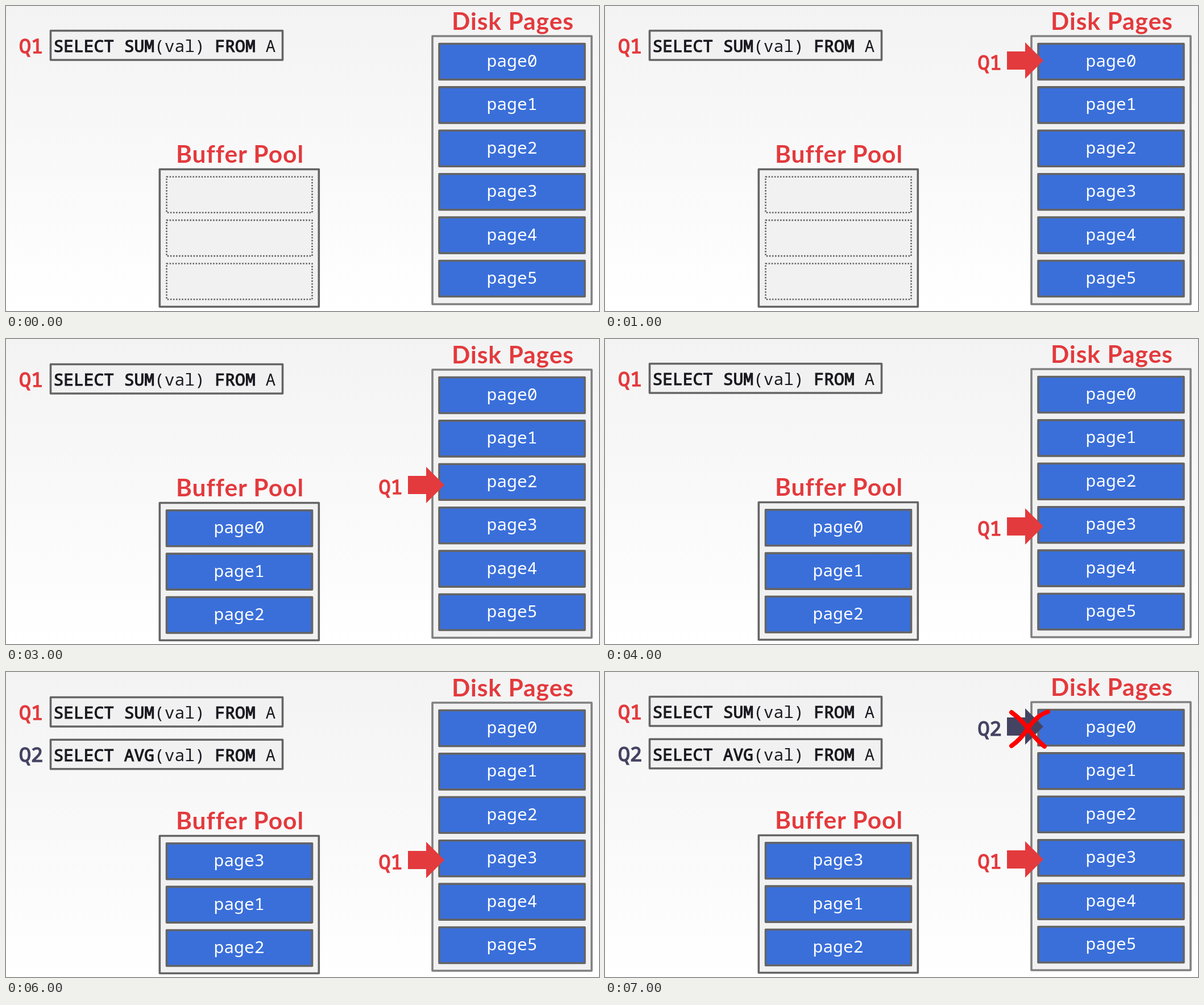
Write an HTML page that moves like this. It is 1043x537 px and loops after 8 s.

```html
<!DOCTYPE html>
<html lang="en">
<head>
<meta charset="utf-8">
<title>Buffer pool scan</title>
<style>
  html, body { margin: 0; width: 100%; height: 100%; overflow: hidden; }
  body { background: linear-gradient(#f3f3f3, #fff); }
  svg { display: block; width: 100%; height: 100%; }
  text { white-space: pre; }
  .code { font: 29.6px "Noto Sans Mono", monospace; fill: #1a1a20; }
  .code tspan { stroke: #1a1a20; stroke-width: 1.2; }
  .label { font: 35px "Noto Sans Mono", monospace; stroke-width: 1.5; }
  .title { font: 700 42.5px Lato, sans-serif; letter-spacing: 1px; text-anchor: middle; fill: #e33a3d; }
  .page text { font: 29.6px "Noto Sans Mono", monospace; fill: #fff; text-anchor: middle; }
  .page rect { fill: #3a6fda; }
  rect { fill: #f1f1f2; stroke: #646464; stroke-width: 3.6; stroke-linejoin: round; }
  .disk { stroke: #808080; }
  .slot { stroke-width: 2.6; stroke-dasharray: 2.6 2.5; }
  .evict { fill: none; stroke: #e33a3d; stroke-width: 7; }
  .cross { fill: none; stroke: #f00; stroke-width: 8; stroke-linecap: round; }
</style>
</head>
<body>
<svg id="stage" viewBox="0 0 1043 537"></svg>
<script>
const RED = "#e33a3d", NAVY = "#454362";
const STEP = 1000;
const ARROW_Y = [64, 140, 224, 298];

// dy: vertical nudge of the slide; pool: page numbers held; at: page Q1 is reading
const steps = [
  { dy: 0, pool: [] },
  { dy: 0, pool: [], at: 0 },
  { dy: 1, pool: [0], at: 0 },
  { dy: 1, pool: [0, 1, 2], at: 2 },
  { dy: 0, pool: [0, 1, 2], at: 3 },
  { dy: 0, pool: [0, 1, 2], at: 3, evict: true },
  { dy: 1, pool: [3, 1, 2], at: 3, q2: true },
  { dy: 0, pool: [3, 1, 2], at: 3, q2: true, denied: true }
];

const box = (x, y, w, h, cls = "") =>
  `<rect class="${cls}" x="${x}" y="${y}" width="${w}" height="${h}"/>`;
const text = (x, y, s, cls = "") =>
  `<text class="${cls}" x="${x}" y="${y}">${s}</text>`;
const label = (x, y, s, color) =>
  `<g fill="${color}" stroke="${color}">${text(x, y, s, "label")}</g>`;

const page = (n, x, y, textX) =>
  `<g class="page">${box(x, y, 256, 63)}${text(textX, y + 40.5, "page" + n)}</g>`;

const query = (name, fn, y, color) =>
  label(23, y + 39, name, color) +
  box(78.5, y, 408, 51.5) +
  text(83.5, y + 37.2, `<tspan>SELECT ${fn}</tspan>(val) <tspan>FROM</tspan> A`, "code");

const arrow = (name, y, color) =>
  label(655.5, y + 48, name, color) +
  `<path fill="${color}" d="M707 ${y + 16}h32v-16l32 32-32 32v-16h-32z"/>`;

const poolY = i => 300.7 + i * 76.4;

function draw(s) {
  const slots = [0, 1, 2].map(i => box(282.5, poolY(i), 256, 63, "slot"));
  const cached = s.pool.map((n, i) => page(n, 282.5, poolY(i), 410));
  const disk = [0, 1, 2, 3, 4, 5].map(n => page(n, 762, 66.5 + n * 76.4, 890));
  return `<g transform="translate(0 ${s.dy})">` + [
    query("Q1", "SUM", 43.5, RED),
    s.q2 ? query("Q2", "AVG", 118.3, NAVY) : "",
    text(891.5, 41.5, "Disk Pages", "title"),
    text(411.5, 276, "Buffer Pool", "title"),
    box(750, 53, 280, 472, "disk"),
    ...disk,
    box(270.3, 287.5, 280, 242),
    ...slots, ...cached,
    s.evict ? box(281.5, 298.7, 257, 64, "evict") : "",
    s.at >= 0 ? arrow("Q1", ARROW_Y[s.at], RED) : "",
    s.denied ? arrow("Q2", 64, NAVY) +
      `<path class="cross" d="M715 71Q733 84 746 102T773 131M779 70Q760 76 745 98T715 130"/>` : ""
  ].join("") + "</g>";
}

const stage = document.getElementById("stage");
let shown = -1;
function tick() {
  const i = Math.floor(performance.now() / STEP) % steps.length;
  if (i !== shown) stage.innerHTML = draw(steps[shown = i]);
  requestAnimationFrame(tick);
}
tick();
</script>
</body>
</html>
```
